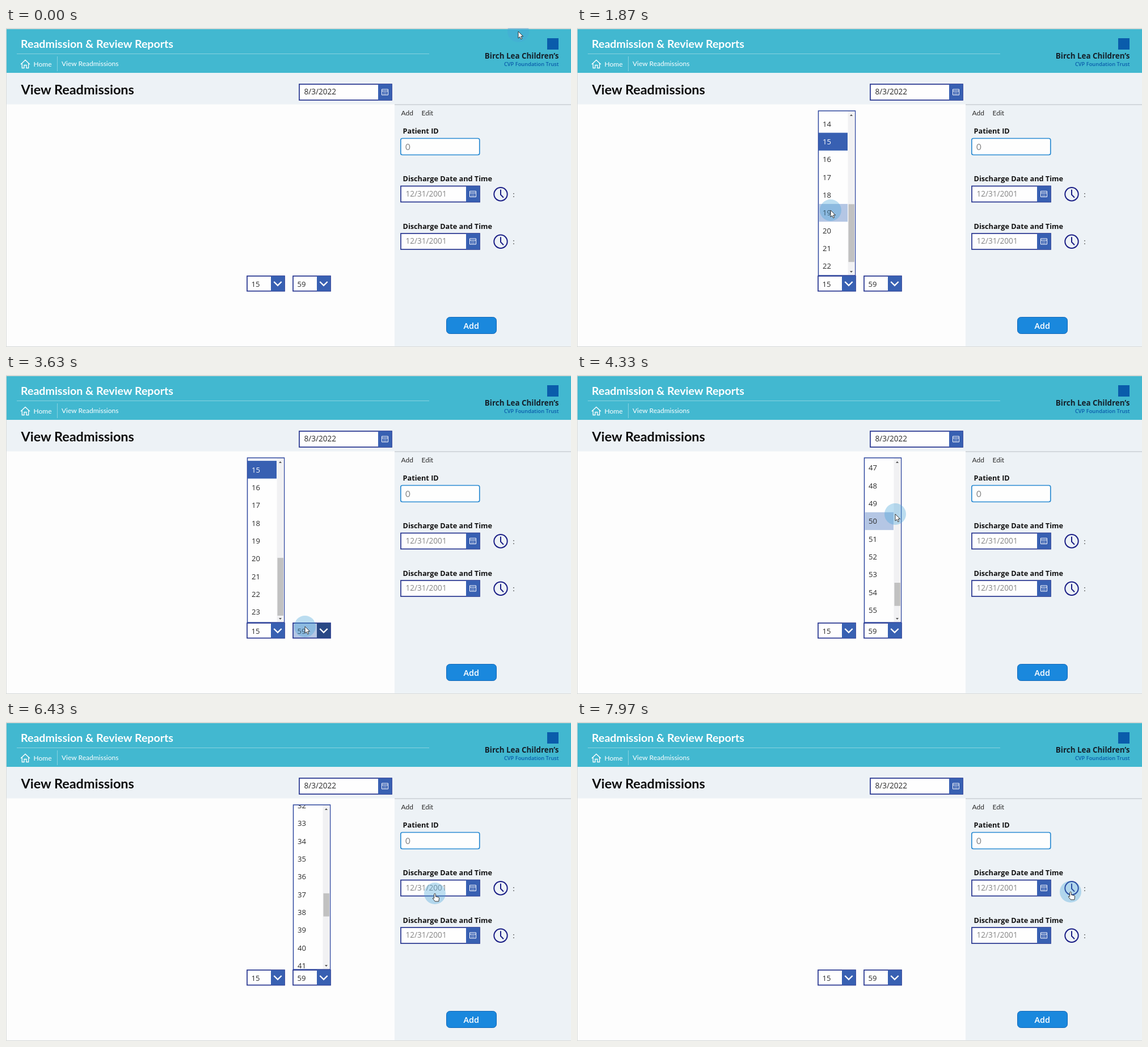
Recreate the animation shown at these times as an HTML page. Size 996 by 562 pixels, loop 8 s.

```html
<!DOCTYPE html>
<html lang="en">
<head>
<meta charset="utf-8">
<title>View Readmissions</title>
<style>
  html, body { margin: 0; width: 100%; height: 100%; overflow: hidden; }
  svg { display: block; width: 996px; height: 562px; }
  text { font: 13.1px "Open Sans", sans-serif; fill: #2b2b2b; white-space: pre; }
  .lato { font: 12px Lato, sans-serif; }
  .white { fill: #fff; }
  .label { font-size: 12.7px; font-weight: 700; fill: #111; }
  .date { font-size: 13.6px; }
  .hint { fill: #858585; }
  .box { fill: #fefefe; stroke: #26348f; stroke-width: 1.7; }
  .btn { fill: #3860b2; }
  .hot .box { fill: #b4c6e4; }
  .hot .btn { fill: #294885; }
  .line { fill: none; stroke: #fff; }
  .glyph { fill: #fff; stroke: #222; stroke-width: .9; stroke-linejoin: round; }
</style>
</head>
<body>
<svg viewBox="0 0 996 562">
  <defs>
    <clipPath id="clip"><rect y="146.5" width="996" height="288"/></clipPath>
    <g id="calendar" class="line">
      <path d="M.5 1.5h11v10H.5zM.5 4.500h11"/>
      <path d="M3 7h6M3 9.500h6" stroke-dasharray="1.5 .75" stroke-opacity=".8"/>
    </g>
    <g id="clock" fill="none" stroke="#1b1f86" stroke-width="2">
      <circle r="11.7"/><path d="M0-8V1L5 6"/>
    </g>
  </defs>

  <rect width="996" height="562" fill="#d9dbd8"/>
  <rect x="1" y="2" width="995" height="77" fill="#42b8d0"/>
  <rect x="1" y="79" width="995" height="482" fill="#edf2f6"/>
  <rect x="1" y="134.5" width="684" height="426" fill="#fdfdfd"/>
  <path d="M685 135h311" stroke="#b9bec3"/>

  <path d="M19 45.5h727M90.5 50v26" stroke="#86d1e0" fill="none"/>
  <path class="line" stroke-width="1.3" d="M26 64l8-7.5 8 7.5M28.3 62.5v8H32v-5h4v5h3.7v-8"/>
  <text class="lato white" x="26" y="35" style="font-size:19.6px;font-weight:700">Readmission &amp; Review Reports</text>
  <text class="lato white" x="48.5" y="68">Home</text>
  <text class="lato white" x="98" y="67">View Readmissions</text>
  <text class="lato" x="26.5" y="116.5" style="font-size:23.4px;font-weight:700;fill:#0c0c0c">View Readmissions</text>
  <text class="lato" x="696.5" y="154">Add</text>
  <text class="lato" x="732.5" y="154">Edit</text>

  <rect x="954" y="18" width="20" height="20" fill="#0a5cab"/>
  <text x="974.5" y="54" text-anchor="end" style="font-size:13.4px;font-weight:700;fill:#14202a">Birch Lea Children’s</text>
  <text x="974.5" y="67" text-anchor="end" style="font-size:9.3px;font-weight:600;fill:#0a5cab">CVP Foundation Trust</text>

  <g id="dates"></g>

  <text class="label" x="699.5" y="186">Patient ID</text>
  <rect x="695.8" y="194.5" width="139" height="29" rx="3" fill="#fefefe" stroke="#2b8bd2" stroke-width="1.7"/>
  <text class="lato hint" x="704" y="214.5" style="font-size:15px">0</text>

  <rect x="776.5" y="509.5" width="88" height="29" rx="6" fill="#1a88dd" stroke="#1468b8"/>
  <text class="white" x="820.3" y="529.5" text-anchor="middle" style="font-size:14.4px;font-weight:600">Add</text>

  <g id="drops"></g>
  <g id="pointer">
    <circle r="19" fill="#46a5d7" fill-opacity=".36"/>
    <path id="arrow" class="glyph" d="M0 0V12L2.800 9.500 4.700 13.700 6.700 12.800 4.800 8.700H8.600Z"/>
    <path id="hand" class="glyph" d="M-1.300 1q1.300-2 2.600 0V5.500L6 6.500q1.800.4 1.600 2.300L6.800 14H.300L-3.700 9q0-2 2.400-.500Z"/>
  </g>
</svg>
<script>
const $ = id => document.getElementById(id);
const LOOP = 8000, MOVE = 560;
const TOP = 145.3, ROW = 31.35, VIEW = 288, TRACK = 266;

const field = (x, y, w, value, hint = '') => `
  <rect class="box" x="${x + 1}" y="${y + 1}" width="${w - 2}" height="28"/>
  <rect class="btn" x="${x + w - 25}" y="${y + 1}" width="24" height="28"/>
  <use href="#calendar" x="${x + w - 19}" y="${y + 8.5}"/>
  <text class="date ${hint}" x="${x + 9.5}" y="${y + 19}">${value}</text>`;

const moment = y => `
  <text class="label" x="699.5" y="${y - 7.5}">Discharge Date and Time</text>
  ${field(695, y, 141, '12/31/2001', 'hint')}
  <use href="#clock" x="872" y="${y + 15.2}"/>
  <text x="893.3" y="${y + 20}">:</text>`;

$('dates').innerHTML = field(516, 98, 165, '8/3/2022') + moment(277.5) + moment(361);

// A list opens with its chosen value in the bottom row.
const drop = (x, count, value, open, close, ...stops) => {
  const start = (value + 1) * ROW - VIEW, scale = TRACK / (count * ROW);
  return { x, count, value, open, close, scale, scroll: [[0, start], ...stops] };
};
const drops = [
  drop(424, 24, 15, 1130, 3760, [1870, 431], [2430, 24 * ROW - VIEW]),
  drop(505, 60, 59, 3760, 7450, [4330, 1471], [5030, 0], [6380, 1017]),
];

// Arrival time and place of each stop.
const path = [[0, 903, 6], [830, 515, 450], [1180, 448, 450], [1870, 447, 321],
  [3200, 440, 422], [3560, 527, 443], [4330, 561, 245], [5030, 533, 281],
  [6430, 756, 302], [7270, 884, 301], [7970, 870, 299]];

$('drops').innerHTML = drops.map(({ x, count, value, scale }) => {
  const rows = Array.from({ length: count }, (_, i) => `
    <text x="${x + 9}" y="${TOP + ROW * (i + .5) + 4.8}" class="${i == value ? 'white' : ''}">${
      String(i).padStart(2, '0')}</text>`);
  return `
  <g class="drop">
    <rect class="box" x="${x + 1}" y="437" width="66" height="26.5"/>
    <rect class="btn" x="${x + 43}" y="437" width="24" height="26.5"/>
    <path class="line" stroke-width="2.4" d="M${x + 48.3} 447l6.7 6.5 6.7-6.5"/>
    <text x="${x + 8.5}" y="455.5">${value}</text>
  </g>
  <g class="list">
    <rect x="${x + 1.5}" y="146" width="65" height="290" fill="#fefefe" stroke="#2f479f" stroke-width="1.5"/>
    <rect x="${x + 53.5}" y="147" width="12.5" height="288" fill="#f1f1f3"/>
    <path fill="#555" d="M${x + 57} 155h5l-2.5-3zM${x + 57} 428h5l-2.5 3z"/>
    <rect class="thumb" x="${x + 54.5}" width="10.5" height="${VIEW * scale}" fill="#c1c1c1"/>
    <g clip-path="url(#clip)">
      <rect class="hover" x="${x + 2}" width="51" height="${ROW}" fill="#b4c6e4"/>
      <g class="rows">
        <rect class="btn" x="${x + 2}" y="${TOP + ROW * value}" width="51" height="${ROW}"/>
        ${rows.join('')}
      </g>
    </g>
  </g>`;
}).join('');

const boxes = document.querySelectorAll('.drop');
const lists = document.querySelectorAll('.list');

// Rest at each stop, then ease to the next within at most MOVE ms.
function at(stops, t) {
  const i = stops.findIndex(s => s[0] > t);
  if (i < 0) return stops.at(-1).slice(1);
  const [from, ...a] = stops[i - 1], [to, ...b] = stops[i];
  const p = Math.max(0, 1 - (to - t) / Math.min(MOVE, to - from));
  const ease = p * p * (3 - 2 * p);
  return a.map((v, j) => v + (b[j] - v) * ease);
}

const show = (el, on) => el.setAttribute('visibility', on ? 'inherit' : 'hidden');
const within = (v, lo, hi) => v >= lo && v <= hi;

function draw(t) {
  const [x, y] = at(path, t);
  $('pointer').setAttribute('transform', `translate(${x} ${y})`);
  const hand = within(y, 277, 308) && (within(x, 695, 836) || within(x, 859, 886));
  show($('hand'), hand);
  show($('arrow'), !hand);

  drops.forEach((d, i) => {
    const part = name => lists[i].querySelector(name);
    const inX = within(x, d.x, d.x + 68);
    boxes[i].classList.toggle('hot', inX && within(y, 436, 465));
    show(lists[i], t >= d.open && t < d.close);

    const [s] = at(d.scroll, t);
    const row = Math.floor((y - TOP + s) / ROW);
    part('.rows').setAttribute('transform', `translate(0 ${-s})`);
    part('.thumb').setAttribute('y', 158 + s * d.scale);
    part('.hover').setAttribute('y', TOP + ROW * row - s);
    show(part('.hover'), inX && within(y, 146, 435));
  });
}

function frame() {
  draw(performance.now() % LOOP);
  requestAnimationFrame(frame);
}
frame();
</script>
</body>
</html>
```
